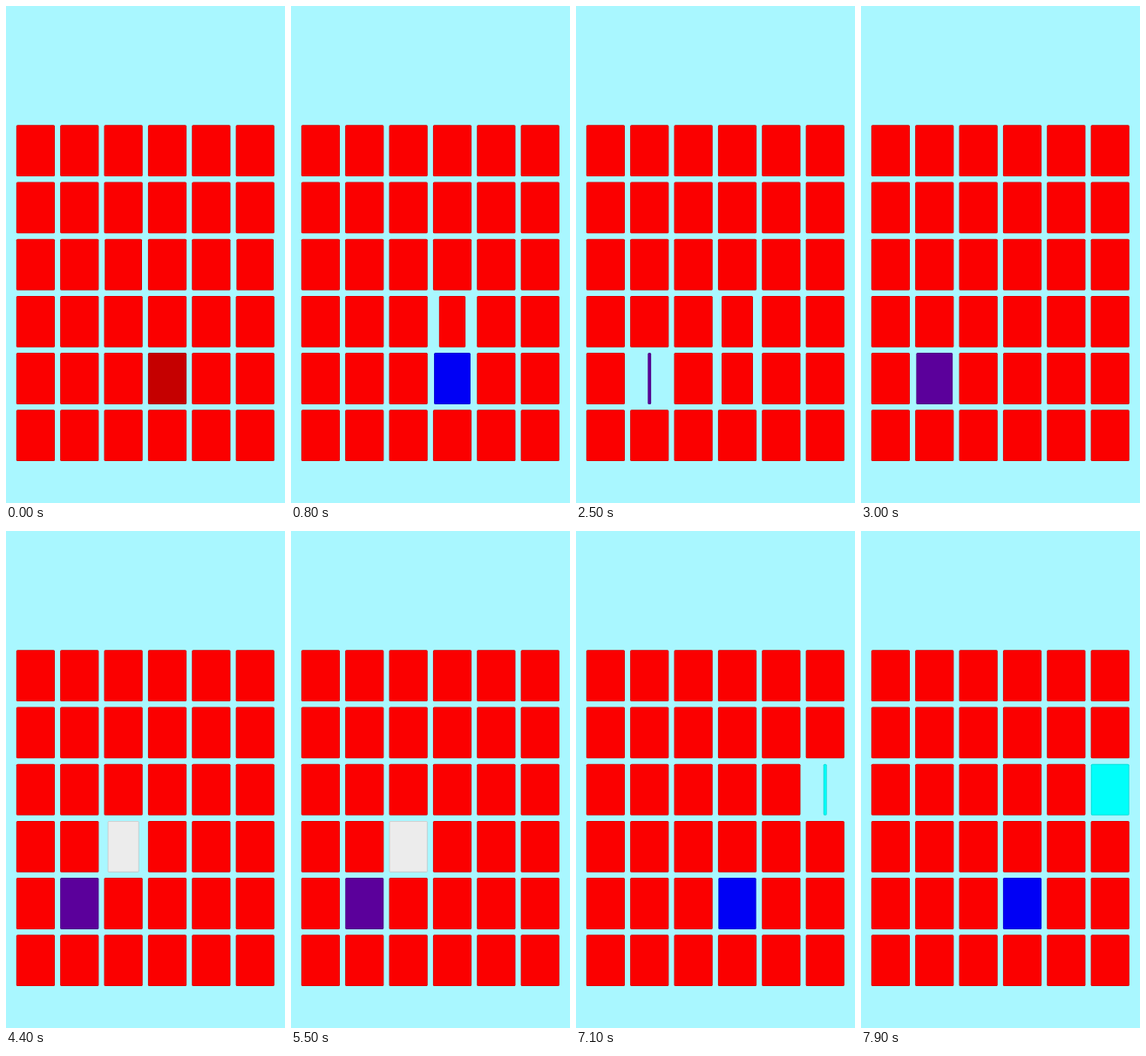
Animation, 320 px wide and 569 px high, one loop 8000 ms. Source, as an HTML page with a canvas:

```html
<!DOCTYPE html>
<html lang="en">
<head>
<meta charset="utf-8">
<title>Card flips</title>
<style>
  html, body { margin: 0; width: 100%; height: 100%; overflow: hidden; background: #a9f7ff; }
  canvas { display: block; }
</style>
</head>
<body>
<canvas id="stage" width="320" height="569"></canvas>
<script>
const ctx = document.getElementById('stage').getContext('2d');
const LOOP = 8000, STEP = 100, RATE = 3;
const W = 44.2, H = 58.8, LEFT = 11.8, TOP = 136.3, DX = 50.36, DY = 65.2;
const RED = [251, 0, 0], BLUE = [0, 0, 245], WHITE = [255, 255, 255];
const PURPLE = [91, 0, 155], GREY = [236, 236, 236], CYAN = [0, 255, 250];

// column, row, start in ms, colour before, colour after
const flips = [
  [2, 2, -830, GREY, RED],
  [5, 2, -830, CYAN, RED],
  [3, 4, 50, RED, BLUE],
  [3, 3, 700, RED, WHITE],
  [3, 4, 1960, BLUE, RED],
  [3, 3, 1960, WHITE, RED],
  [1, 4, 2250, RED, PURPLE],
  [2, 3, 3860, RED, GREY],
  [1, 4, 5490, PURPLE, RED],
  [2, 3, 5490, GREY, RED],
  [3, 4, 6169, RED, BLUE],
  [5, 2, 6850, RED, CYAN]
];

// column, row, release time in ms
const taps = [
  [3, 4, 50], [3, 3, 700], [0, 4, 2000], [1, 4, 2250],
  [2, 3, 3860], [3, 4, 6169], [5, 2, 6850]
];

const clamp = v => Math.min(1, Math.max(0, v));
const at = (col, row) => e => e[0] === col && e[1] === row;

function pose(col, row, t) {
  const flip = flips.filter(at(col, row)).filter(f => f[2] <= t).pop();
  if (!flip) return { scale: 1, color: RED };
  // the remaining half turn decays exponentially
  const angle = Math.PI * Math.exp(-RATE * (t - flip[2]) / 1000);
  return {
    scale: Math.abs(Math.cos(angle)),
    color: angle > Math.PI / 2 ? flip[3] : flip[4]
  };
}

function pressed(col, row, t) {
  return taps.filter(at(col, row)).reduce((most, [, , end]) =>
    Math.max(most, Math.min(clamp((t - end + 150) / 100), clamp((end + 100 - t) / 100))), 0);
}

function drawCard(col, row, t) {
  const { scale, color } = pose(col, row, t);
  const w = W * scale;
  if (w < 0.8) return;
  const tint = 1 - 0.215 * pressed(col, row, t);
  const rgb = k => `rgb(${color.map(c => Math.round(c * tint * k))})`;
  const x = LEFT + col * DX + (W - w) / 2, y = TOP + row * DY;
  ctx.fillStyle = rgb(0.84);
  ctx.beginPath();
  ctx.roundRect(x, y, w, H, Math.min(1.5, w / 2));
  ctx.fill();
  if (w > 2) {
    ctx.fillStyle = rgb(1);
    ctx.fillRect(x + 0.8, y + 0.8, w - 1.6, H - 1.6);
  }
}

function draw(t) {
  ctx.fillStyle = '#a9f7ff';
  ctx.fillRect(0, 0, 320, 569);
  for (let row = 0; row < 6; row++)
    for (let col = 0; col < 6; col++) drawCard(col, row, t);
}

const begin = performance.now();
function tick() {
  const t = (performance.now() - begin) % LOOP;
  draw(Math.floor(t / STEP) * STEP);
  requestAnimationFrame(tick);
}
tick();
</script>
</body>
</html>
```
